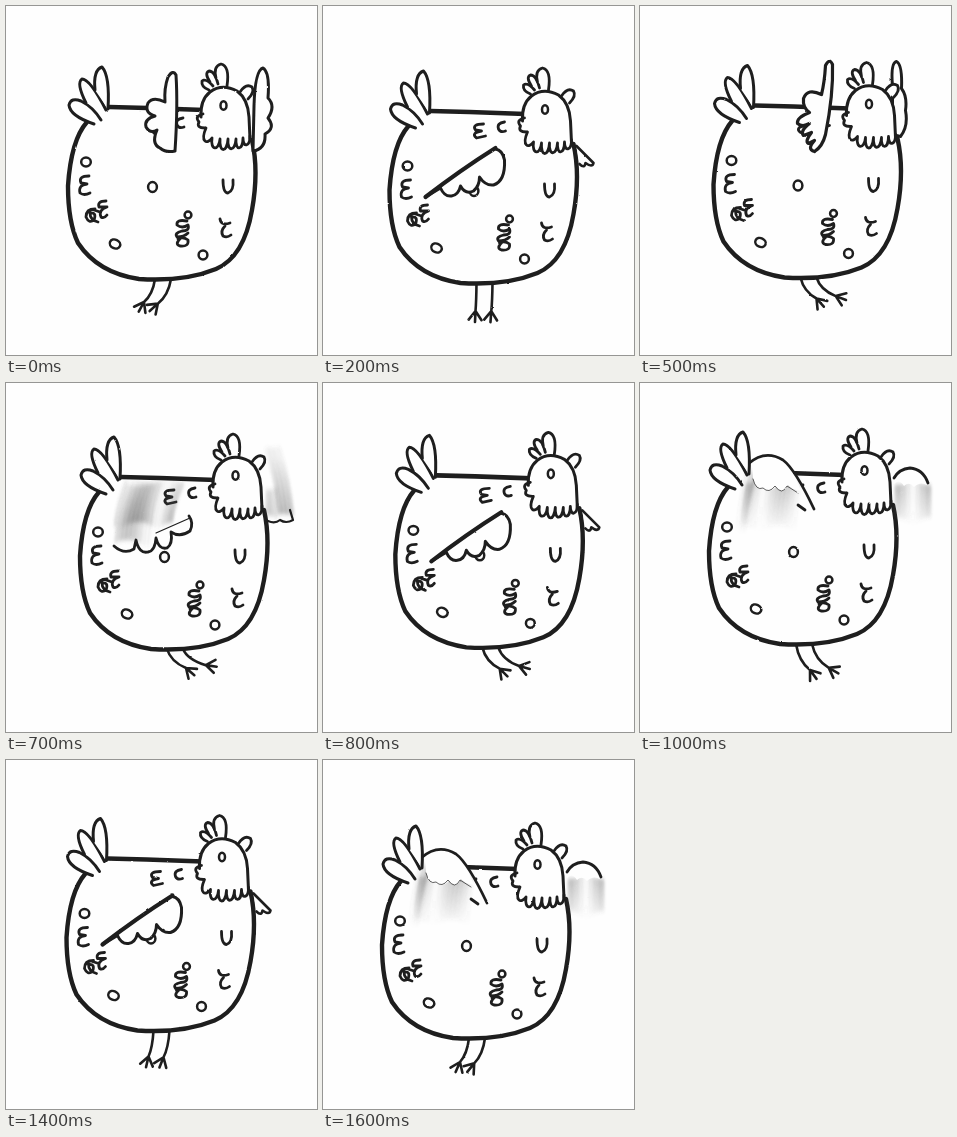
Write an HTML page that moves like this. It is 311 by 349 pixels and loops after 1700 ms.

```html
<!DOCTYPE html>
<html lang="en">
<head>
<meta charset="utf-8">
<title>Flapping hen</title>
<style>
html, body { margin: 0; width: 100%; height: 100%; overflow: hidden; background: #fefefe; }
svg { display: block; width: 100vw; height: 100vh; }
#hen { fill: none; stroke: #1e1e1e; stroke-linecap: round; stroke-linejoin: round; }
</style>
</head>
<body>
<svg viewBox="0 0 311 349">
  <defs>
    <filter id="rough" filterUnits="userSpaceOnUse" x="0" y="0" width="311" height="349" color-interpolation-filters="sRGB">
      <feTurbulence id="noise" type="fractalNoise" baseFrequency=".25" numOctaves="1"/>
      <feDisplacementMap in="SourceGraphic" scale="1.8" xChannelSelector="R" yChannelSelector="G"/>
    </filter>
    <filter id="soft" filterUnits="userSpaceOnUse" x="0" y="0" width="311" height="349">
      <feGaussianBlur stdDeviation="1 2"/>
    </filter>
    <linearGradient id="fadeIn" gradientUnits="userSpaceOnUse" x1="0" y1="72" x2="0" y2="160">
      <stop offset=".1" stop-color="#555" stop-opacity=".15"/>
      <stop offset=".8" stop-color="#555" stop-opacity=".75"/>
    </linearGradient>
    <linearGradient id="fadeOut" gradientUnits="userSpaceOnUse" x1="0" y1="108" x2="0" y2="162">
      <stop offset="0" stop-color="#555" stop-opacity=".7"/>
      <stop offset="1" stop-color="#555" stop-opacity="0"/>
    </linearGradient>
  </defs>
  <g filter="url(#rough)"><g id="hen"></g></g>
</svg>
<script>
const STEP = 100, STEPS = 17;
const hen = document.getElementById('hen');
const noise = document.getElementById('noise');

// step, body x, body y, leg swing, leg length
const keys = [
  [0, 0, 0, -11, 22], [2, 4.5, 4, -1, 27], [5, 11.5, -1.5, 16, 20], [7, 12, -7, 19, 18],
  [10, 7, -12, 14, 25], [12, 0, -10, -1, 27], [16, -3, 5, -9, 23], [17, 0, 0, -11, 22]
];
const wingCycle = ['up', 'smear', 'down', 'down', 'arch', 'raised'];

const line = (d, w = 2.8, fill = 'none') => `<path d="${d}" stroke-width="${w}" fill="${fill}"/>`;
const shape = (d, w = 3) => line(d, w, '#fefefe');
const mask = d => shape(d + 'Z', 0);
const ring = (x, y, rx, ry = rx, tilt = 0) =>
  `<ellipse cx="${x}" cy="${y}" rx="${rx}" ry="${ry}" stroke-width="2.5" transform="rotate(${tilt} ${x} ${y})"/>`;

// Blurred strokes that stand for a fast wing
function streaks(x0, x1, y0, y1, lean, fade, strength = 1) {
  let out = '';
  for (let x = x0, i = 0; x <= x1; x += 4, i++) {
    const r = Math.abs(Math.sin(i * 12.9 + x0));
    out += `<path d="M${x + lean} ${y0 + r * 6}Q${x + lean * .2} ${(y0 + y1) / 2} ${x} ${y1 - r * 8}"
      stroke="url(#${fade})" stroke-width="${2 + r * 3}" opacity="${strength * (.12 + r * .5)}"/>`;
  }
  return `<g filter="url(#soft)">${out}</g>`;
}

const farWings = {
  up: () => shape('M248 100Q249 64 257 62Q264 66 262 92Q270 100 262 112Q270 122 259 128Q260 143 247 145Z'),
  raised: () => shape('M241 82Q239 58 245 57Q251 60 250 84Q256 92 254 106Q257 122 249 132L241 130Z'),
  smear: () => streaks(262, 274, 68, 144, -13, 'fadeIn', .8) + streaks(250, 260, 110, 145, 0, 'fadeIn', .6) +
    line('M250 145Q257 148 262 144Q268 148 275 144L272 134', 2.2),
  down: () => shape('M249 136L266 153Q265 158 258 153Q257 159 252 154', 2.6),
  arch: () => streaks(250, 282, 110, 152, 0, 'fadeOut', .9) +
    mask('M247 113Q252 107 257 115Q262 110 267 116Q273 110 280 114Q273 93 260 98Q250 100 245 108') +
    line('M247 107Q252 98 263 97Q276 98 281 112', 2.8)
};

const nearWings = {
  up: () => shape('M169 145Q172 100 170 69Q167 63 162 71Q158 82 159 96Q147 90 142 97Q138 107 149 110Q138 113 140 121Q144 128 151 124Q145 138 154 142Q160 147 169 145'),
  raised: () => shape('M163 147Q171 142 174 130Q182 90 181 60Q178 53 174 61Q173 78 170 90Q156 83 152 94Q151 103 158 108Q145 113 146 119Q151 123 158 119Q148 127 152 131L160 128Q153 137 157 139L163 136Q155 145 163 147', 3.2),
  smear: () => streaks(97, 156, 103, 152, 11, 'fadeIn', .75) +
    streaks(98, 130, 106, 170, 11, 'fadeIn', .6) +
    line('M138 157L172 142', 1.2) +
    line('M96 170Q106 179 116 173L118 164Q121 178 130 176Q137 175 138 162Q141 174 149 172Q155 168 153 156Q162 162 172 155Q176 147 171 140'),
  down: () => shape('M98 187L113 178Q117 187 124 186Q131 185 133 176Q138 185 146 181Q152 176 152 167Q158 176 166 175Q178 171 177 150Q175 140 168 139') +
    line('M98 187Q133 160 168 138', 4.2),
  arch: () => mask('M90 114Q102 90 118 84Q140 83 153 112L166 135L130 140') +
    streaks(96, 150, 108, 160, 5, 'fadeOut', .7) +
    streaks(88, 98, 98, 178, 12, 'fadeOut', 1.1) +
    mask('M105 92Q118 80 136 90Q146 98 154 120Q145 119 141 114Q136 125 129 116Q122 123 116 118Q108 118 106 108') +
    line('M106 108Q109 120 116 117Q122 123 128 115Q135 125 140 115L151 122', .7) +
    line('M101 93Q118 78 136 89Q148 98 167 138M151 134L158 139', 2.8)
};

const outline = 'M81 116Q65 134 62 180Q62 216 72 237Q92 267 133 273Q178 276 210 263Q238 251 246 204Q253 165 246 134';
const body = () => mask(outline + 'L230 104L104 101') + line(outline, 4.4) + line('M103 101L142 102L198 104', 4.6);

const tail = () =>
  shape('M88 118Q64 110 63 99Q65 91 75 95Q87 101 95 114') +
  shape('M80 97Q70 77 76 73Q84 73 100 104') +
  shape('M89 84Q87 64 96 61Q104 70 102 103');

const marks = () =>
  ring(80, 156, 4.8, 4.4) + ring(146.5, 181, 4.4, 5) + ring(109, 238, 5.4, 4.4, 25) +
  ring(197, 249, 4.4) + ring(182, 209, 3.4) +
  line('M83 170Q72 170 75 177L81 178Q72 179 74 187Q78 190 84 187') +
  line('M100 195Q91 195 93 201L101 201Q92 204 95 211Q98 213 101 209M89 203Q80 203 80 211Q83 218 88 214Q91 206 84 207Q84 214 92 216M88 204L94 206') +
  line('M181 215Q170 213 171 219Q176 223 182 219Q184 225 176 225Q168 227 171 231Q178 231 182 227M175 232Q168 238 174 240Q183 241 182 234Q177 230 172 233') +
  line('M217 174Q217 187 222 187Q228 185 227 174') +
  line('M214 213Q215 220 224 217M219 220Q214 225 217 230Q221 232 225 229') +
  line('M177 112Q169 113 171 119Q173 123 178 121') +
  line('M156 114Q144 114 148 120L154 121Q143 123 149 128L158 126');

const head = () =>
  shape('M203 84Q195 81 196 75Q200 72 207 80', 2.8) +
  shape('M204 76Q198 67 203 65Q209 65 212 78', 2.8) +
  shape('M210 72Q207 60 215 58Q224 60 221 80', 2.8) +
  shape('M234 86Q240 77 246 81Q249 86 242 93', 2.8) +
  mask('M199 122Q191 98 204 86Q216 77 231 85Q242 93 243 111L244 134L222 137L202 131') +
  line('M195 111Q194 94 204 86Q216 77 231 85Q242 93 243 111L244 133', 3) +
  line('M197 108Q188 110 193 116Q190 122 199 122') +
  line('M200 122C194 136 201 139 206 132c-2 13 7 13 8 1c-1 14 7 14 8 0c-1 13 7 13 8 0c-1 12 7 12 7 -1c0 10 7 9 7 -2') +
  ring(217.5, 99.5, 3, 4.3);

function leg(x, swing, length, turn) {
  const ax = x + swing, ay = 274 + length;
  let d = `M${x} 273Q${x + swing * .2} ${274 + length * .65} ${ax} ${ay}`;
  for (const spread of [-36, 0, 36]) {
    const a = (90 - swing * turn + spread) * Math.PI / 180;
    d += `M${ax} ${ay}l${11 * Math.cos(a)} ${11 * Math.sin(a)}`;
  }
  return line(d, 2.6);
}

function pose(step) {
  const i = keys.findIndex(k => k[0] > step);
  const a = keys[i - 1], b = keys[i];
  const t = (step - a[0]) / (b[0] - a[0]);
  return a.slice(1).map((v, n) => v + (b[n + 1] - v) * t);
}

function draw(step) {
  const [x, y, swing, length] = pose(step);
  const wing = wingCycle[step % 6];
  noise.setAttribute('seed', step + 1);
  hen.setAttribute('transform', `translate(${x} ${y})`);
  hen.innerHTML = leg(149, swing, length, 2.6) + leg(165, swing * 1.2, length - swing * .15, 3.6) +
    body() + marks() + farWings[wing]() + head() + nearWings[wing]() + tail();
}

let shown = -1;
function tick() {
  const step = Math.floor(performance.now() / STEP) % STEPS;
  if (step !== shown) draw(shown = step);
  requestAnimationFrame(tick);
}
tick();
</script>
</body>
</html>
```
